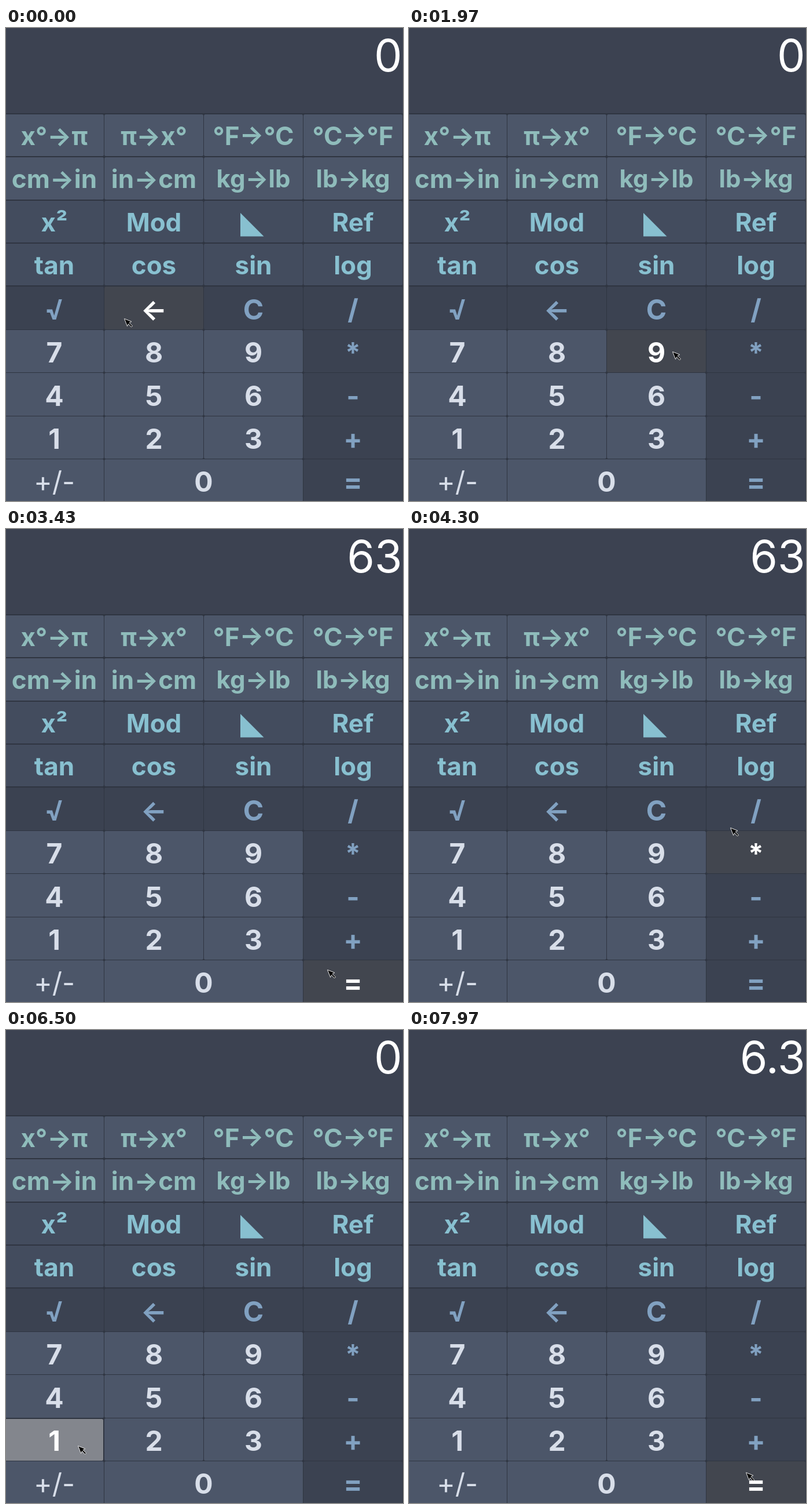
An HTML page with a canvas for the animation above (8000 ms loop, 686 px wide and 816 px high).

```html
<!DOCTYPE html>
<html lang="en">
<head>
<meta charset="utf-8">
<title>Calculator</title>
<style>
html, body { margin: 0; width: 100%; height: 100%; overflow: hidden; background: #2f3541; }
canvas { display: block; }
</style>
</head>
<body>
<canvas id="stage" width="686" height="816"></canvas>
<script>
const ctx = document.getElementById('stage').getContext('2d');
const LOOP = 8000, HOVER_LAG = 50, JUMP = 1165;
const COL = 172, ROW = 74.4;
const FONT = 'Inter, "Noto Sans", sans-serif';

const STYLES = {
  convert: { bg: '#4c5669', ink: '#8fbcbb', size: 44 },
  func: { bg: '#434c5e', ink: '#88c0d0', size: 44 },
  op: { bg: '#3b4251', ink: '#81a1c1', size: 48 },
  digit: { bg: '#4c5669', ink: '#d8dee9', size: 48 }
};
const ROWS = [
  'x°→π π→x° °F→°C °C→°F',
  'cm→in in→cm kg→lb lb→kg',
  'x² Mod ◣ Ref',
  'tan cos sin log',
  '√ ← C /',
  '7 8 9 *',
  '4 5 6 -',
  '1 2 3 +',
  '+/- 0 _ ='
];

function makeKey(label, row, col) {
  const kind = row < 2 ? 'convert' : row < 4 ? 'func' : row === 4 || col === 3 ? 'op' : 'digit';
  const edge = r => Math.round(148.8 + ROW * r);
  const small = label.includes('kg');
  return {
    label, style: STYLES[kind],
    x: COL * col - 2, y: edge(row),
    w: COL * (label === '0' ? 2 : 1) - 1,
    h: edge(row + 1) - edge(row) - (row < 4 ? 2 : 1),
    size: small ? 42 : STYLES[kind].size,
    weight: label === '+/-' ? 400 : 700,
    base: Math.round(201.9 + ROW * row + (row < 4 ? 0 : 3.2)) - (small ? 1 : 0)
  };
}
const keys = ROWS.flatMap((row, r) => row.split(' ').map((label, c) => makeKey(label, r, c)))
  .filter(k => k.label !== '_');

// Pointer stops: arrival time, x, y, length of rest
const stops = [
  [0, 204, 501, 20], [300, 165, 588, 0], [470, 125, 578, JUMP - 471],
  [JUMP, 609, 573, 355], [1880, 455, 558, 360], [2470, 525, 702, 0],
  [2800, 567, 771, 500], [3880, 474, 640, 0], [4300, 555, 515, 0],
  [4570, 583, 487, 400], [5400, 298, 664, 0], [5570, 158, 662, 0],
  [5800, 124, 717, 800], [6850, 255, 778, 220], [7330, 582, 763, 670]
].map(([t, x, y, rest]) => ({ t, x, y, rest, leave: t + rest }));

// Key, time down, time up, reading shown on release
const presses = [
  ['7', 825, JUMP, '7'], ['*', 1340, 1480, '0'], ['9', 1980, 2120, '9'], ['=', 3095, 3260, '63'],
  ['/', 4765, 4930, '0'], ['1', 6365, 6560, '1'], ['0', 6900, 7050, '10'], ['=', 7465, 7630, '6.3']
];

// Rests have no speed, so the pointer eases in and out of them.
function speed(i, axis) {
  const a = stops[i - 1], b = stops[i], c = stops[i + 1];
  return b.rest ? 0 : (c[axis] - a[axis]) / (c.t - a.leave);
}

function pointerAt(t) {
  const i = stops.findLastIndex(s => s.t <= t);
  const p = stops[i], q = stops[i + 1];
  if (t <= p.leave || !q) return [p.x, p.y];
  const d = q.t - p.leave, u = (t - p.leave) / d, v = 1 - u;
  return ['x', 'y'].map(k =>
    v * v * (1 + 2 * u) * p[k] + u * u * (3 - 2 * u) * q[k] +
    d * u * v * (v * speed(i, k) - u * speed(i + 1, k)));
}

function keyAt([x, y]) {
  return keys.find(k => x >= k.x - 1 && x < k.x + k.w + 1 && y >= k.y - 1 && y < k.y + k.h + 1);
}

function polygon(points) {
  ctx.beginPath();
  points.forEach(p => ctx.lineTo(...p));
  ctx.closePath();
  ctx.fill();
}

function drawKey(key, hovered, pressed) {
  const inset = pressed ? 1 : 0;
  ctx.fillStyle = pressed ? '#83868d' : hovered ? '#42464f' : key.style.bg;
  ctx.beginPath();
  ctx.roundRect(key.x, key.y + inset, key.w - inset, key.h - inset, 2.5);
  ctx.fill();

  ctx.fillStyle = hovered || pressed ? '#ffffff' : key.style.ink;
  if (key.label === '◣') {
    polygon([[405, 319], [405, 359.5], [445.5, 359.5]]);
    return;
  }
  ctx.font = `${key.weight} ${key.size}px ${FONT}`;
  ctx.textAlign = 'center';
  ctx.fillText(key.label, key.x + key.w / 2, key.base);
}

function drawPointer([x, y]) {
  ctx.save();
  ctx.translate(Math.round(x), Math.round(y));
  ctx.fillStyle = '#000';
  polygon([[0.5, 0.5], [13, 5.5], [9, 7.5], [14.5, 13], [12.5, 15], [7.5, 9.5], [5.5, 13.5]]);
  ctx.strokeStyle = '#e8e8e8';
  ctx.stroke();
  ctx.restore();
}

function draw(t) {
  const hover = keyAt(pointerAt(Math.max(t - HOVER_LAG, t < JUMP ? 0 : JUMP)));
  const press = presses.find(p => t >= p[1] && t < p[2]);
  const done = presses.filter(p => t >= p[2]).pop();

  ctx.fillStyle = '#2f3541';
  ctx.fillRect(0, 0, 686, 816);
  ctx.fillStyle = '#3c4251';
  ctx.fillRect(0, 0, 686, 147);
  ctx.fillStyle = '#ffffff';
  ctx.font = `400 77px ${FONT}`;
  ctx.textAlign = 'right';
  ctx.fillText(done ? done[3] : '0', 684.5, 75);

  keys.forEach(k => drawKey(k, k === hover, press && press[0] === k.label));
  drawPointer(pointerAt(t));
}

const start = performance.now();
function tick() {
  draw((performance.now() - start) % LOOP);
  requestAnimationFrame(tick);
}
tick();
</script>
</body>
</html>
```
